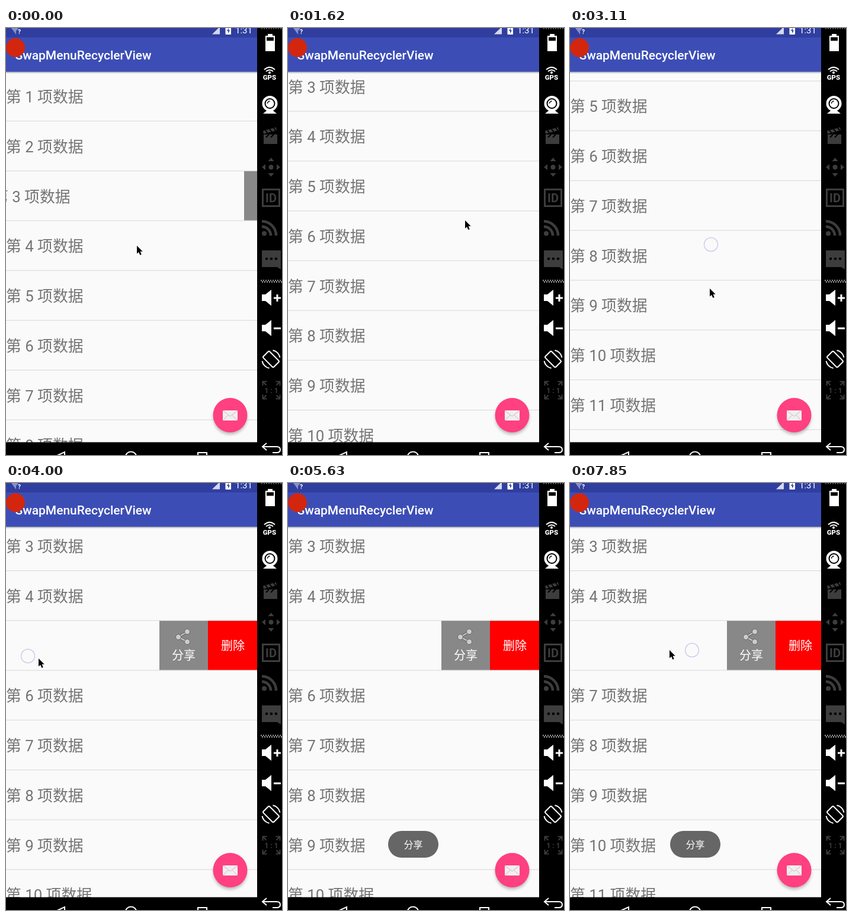
An HTML page that plays this animation: 466x718 px, repeating every 8000 ms.

```html
<!DOCTYPE html>
<html lang="zh">
<head>
<meta charset="utf-8">
<title>SwapMenuRecyclerView</title>
<style>
html, body { margin: 0; width: 100%; height: 100%; overflow: hidden; background: #000; }
svg { display: block; }
text { font-family: Roboto, "Noto Sans CJK SC", "Noto Sans CJK", sans-serif; }
.label { font-size: 25.8px; fill: #747474; }
.action { font-size: 20px; fill: #fff; text-anchor: middle; }
.dim { fill: #3d3d3d; }
.dimLine { fill: none; stroke: #3d3d3d; }
.line { fill: none; stroke: #fff; stroke-width: 2; }
</style>
</head>
<body>
<svg width="466" height="718" viewBox="0 0 466 718">
  <defs>
    <clipPath id="listClip"><rect y="73" width="424" height="624"/></clipPath>
    <linearGradient id="barShade" x2="0" y2="1">
      <stop stop-color="#000" stop-opacity=".35"/><stop offset="1" stop-color="#000" stop-opacity="0"/>
    </linearGradient>
    <filter id="soft" x="-30%" y="-30%" width="160%" height="160%"><feGaussianBlur stdDeviation="2.5"/></filter>
    <g id="share" fill="#ccc" stroke="#666">
      <path d="M47 19L32 28L47 36" fill="none" stroke-width="4"/>
      <path d="M47 19L32 28L47 36" fill="none" stroke="#ccc" stroke-width="2"/>
      <circle cx="47" cy="19" r="4.5"/><circle cx="32" cy="28" r="4.5"/><circle cx="47" cy="36" r="4.5"/>
    </g>
    <path id="speaker" d="M432 -6h6l10 -8v27l-10 -8h-6z" fill="#fff"/>
    <path id="corner" class="dimLine" d="M-14.500 -7.500v-7h7M-14.500 -14.500l6 6" stroke-width="2"/>
    <path id="turn" class="line" d="M3 -15a15 15 0 0 1 12 12"/>
  </defs>

  <rect width="424" height="718" fill="#fafafa"/>
  <g id="list" clip-path="url(#listClip)"></g>
  <rect y="73" width="424" height="4" fill="url(#barShade)"/>

  <!-- status and app bars -->
  <rect y="15" width="424" height="58.600" fill="#3c4eb6"/>
  <rect width="424" height="16" fill="#303f9f"/>
  <path d="M9 0h12l-4 5v6z" fill="#8790c8"/>
  <text x="20" y="10" font-size="10" font-weight="700" fill="#fff">?</text>
  <path d="M348 10.500L361 -2v12.500z" fill="#d5d9ee"/>
  <rect x="370.500" y="-2" width="9.500" height="13" rx="1" fill="#fff"/>
  <path d="M376 0l-3 5h2v4l3-5h-2z" fill="#303f9f"/>
  <text x="387" y="9" font-size="15" fill="#fff">1:31</text>
  <text x="15.500" y="53" font-size="20.940" font-weight="500" fill="#fff">SwapMenuRecyclerView</text>
  <circle cx="16" cy="33" r="16" fill="#d3260f"/>

  <!-- toast and floating button -->
  <g id="toast">
    <rect x="169" y="585" width="85" height="45" rx="22.500" fill="#666"/>
    <text x="211.500" y="613.500" font-size="16" fill="#fff" text-anchor="middle">分享</text>
  </g>
  <circle cx="378.500" cy="655" r="28.500" opacity=".25" filter="url(#soft)"/>
  <circle cx="378.500" cy="651" r="29" fill="#ff4081"/>
  <rect x="366" y="643" width="25" height="17" fill="#f1eef0"/>
  <path d="M366 643l12.500 10L391 643M366 660l9.500-9.500M391 660l-9.500-9.500" fill="none" stroke="#c4bcc0"/>

  <!-- navigation bar -->
  <rect y="696.500" width="424" height="22"/>
  <g class="line"><path d="M86 719l13-6v6"/><circle cx="211" cy="722" r="9.500"/><path d="M324 719v-5h15v5"/></g>

  <!-- emulator tools -->
  <rect x="424" width="42" height="718"/>
  <path d="M431 1h35" stroke="#555" stroke-width="2" stroke-dasharray="2 2"/>
  <path d="M430 424.500h36M432 427h34" stroke="#aaa" stroke-width="2" stroke-dasharray="2 2"/>
  <path d="M442 10h8v3h4v26h-16v-26h4z" fill="#fff"/>
  <rect x="440" y="15.500" width="12" height="6"/>
  <path class="line" d="M436 70q9-8 18 0M439 73q6-5 12 0"/>
  <circle cx="445" cy="75" r="2" fill="#fff"/>
  <text x="445" y="87" font-size="11.500" font-weight="900" fill="#fff" text-anchor="middle">GPS</text>
  <circle cx="445.500" cy="127" r="13" fill="#fff"/>
  <circle cx="445.500" cy="127" r="8" fill="none" stroke="#000" stroke-width="2"/>
  <path d="M441.500 127a4 4 0 0 1 4-4" fill="none" stroke="#000" stroke-width="1.500"/>
  <path d="M440 139h11l6 5h-23z" fill="#fff"/>
  <path class="dim" d="M435 179h23v16h-23zM434 173l22-6 1 5-22 6z"/>
  <path d="M438 172l4 5M445 170l4 5M452 168l4 5M439 184l5-5M447 184l5-5" stroke="#000" stroke-width="2"/>
  <circle class="dim" cx="447.500" cy="234" r="4"/>
  <path class="dim" d="M447.500 218l5 6h-10zM447.500 250l5-6h-10zM432 234l6-5v10zM463 234l-6-5v10z"/>
  <rect class="dimLine" x="433.500" y="271.500" width="28" height="28" stroke-width="3"/>
  <text class="dim" x="447.500" y="293" font-size="20" font-weight="700" text-anchor="middle">ID</text>
  <path class="dimLine" stroke-width="4.500" d="M432 334a15 15 0 0 1 15 15M432 325a24 24 0 0 1 24 24"/>
  <circle class="dim" cx="436" cy="345.500" r="4"/>
  <path class="dim" d="M432 374h32v32l-6-4h-26z"/>
  <path d="M440 388h17" stroke="#000" stroke-width="4.600" stroke-linecap="round" stroke-dasharray="0 8"/>
  <use href="#speaker" y="454"/><use href="#speaker" y="505"/>
  <path class="line" d="M452 454h12M458 448v12M452 505h12" style="stroke-width:3"/>
  <g transform="translate(447.500 557)">
    <rect class="line" x="-7.500" y="-12.500" width="15" height="25" rx="2" transform="rotate(-45)"/>
    <use href="#turn"/><use href="#turn" transform="rotate(180)"/>
  </g>
  <g transform="translate(448 609)">
    <use href="#corner"/><use href="#corner" transform="rotate(90)"/>
    <use href="#corner" transform="rotate(180)"/><use href="#corner" transform="rotate(270)"/>
    <text class="dim" y="4.500" font-size="12" font-weight="700" text-anchor="middle">1 : 1</text>
  </g>
  <path class="line" d="M440 698l-7 6 7 6M433 704h24q6 0 6 5t-6 5h-7"/>

  <circle id="touch" r="11.500" fill="none" stroke="#cdcdec" stroke-width="1.500"/>
  <g id="cursor"><path d="M0 0V14.500L3.300 11.500L5.700 17L8.300 16L6 10.500H10.500Z" stroke="#fff" paint-order="stroke" transform="scale(.93)"/></g>
</svg>
<script>
const LOOP = 8000, STEP = 148.1, ROW = 83.75, TOP = 72.5, MENU = 165, WIDTH = 424;
const $ = id => document.getElementById(id);

const gestures = [
  { from: 7, to: 10, scroll: 184 },
  { from: 12, to: 14, row: 5, swipe: MENU },
  { from: 18, to: 20, scroll: 134.7, row: 5, swipe: -MENU },
  { from: 21, to: 23, scroll: -142.2 },
  { from: 25, to: 27, row: 5, swipe: MENU },
  { from: 49, to: 53.15, row: 6, swipe: MENU }
];

// Places the mouse passes: step, x, y.
const stops = [
  [0, 221, 366], [6, 134, 572], [7, 196, 510], [8, 206, 484],
  [12, 330, 270], [14, 150, 268], [17, 209, 488], [20, 238, 364], [21, 236, 438], [23, 240, 480],
  [25, 285, 293], [26, 37, 291], [27, 55, 295], [31, 285, 270], [39, 285, 270],
  [40, 451, 300], [43, 385, 275], [48, 366, 323], [49, 320, 281], [53, 168, 281]
];

const ramp = (k, from, to) => Math.min(1, Math.max(0, (k - from) / (to - from)));

const total = (k, kind, row) => gestures
  .filter(g => g[kind] && (!row || g.row === row))
  .reduce((sum, g) => sum + g[kind] * ramp(k, g.from, g.to), 0);

function pointer(k) {
  const i = Math.max(1, stops.findIndex(s => s[0] >= k));
  const [from, x0, y0] = stops[i - 1], [to, x1, y1] = stops[i], p = ramp(k, from, to);
  return [x0 + (x1 - x0) * p, y0 + (y1 - y0) * p];
}

const rows = Array.from({ length: 13 }, (_, i) => {
  const row = document.createElementNS("http://www.w3.org/2000/svg", "g");
  row.innerHTML = `<g class="slide"><text class="label" y="52.5">第 ${i + 1} 项数据</text>
    <g transform="translate(${WIDTH})">
      <rect y=".75" width="82" height="83" fill="#888"/><rect x="82" y=".75" width="83" height="83" fill="#f00"/>
      <use href="#share"/><text class="action" x="41" y="66">分享</text>
      <text class="action" x="124" y="49.5">删除</text>
    </g></g><rect y="${ROW - 0.25}" width="${WIDTH}" height="1" fill="#d8d8d8"/>`;
  $("list").append(row);
  return row;
});

const move = (el, x, y) => el.setAttribute("transform", `translate(${x} ${y})`);
const show = (el, visible) => el.style.display = visible ? "" : "none";

function draw(k) {
  const scroll = total(k, "scroll"), gap = ROW * ramp(k, 44, 46);
  rows.forEach((row, i) => {
    const n = i + 1;
    const closing = n === 3 ? 22 * (1 - ramp(k, 0, 1)) : 0;
    move(row, 0, TOP + i * ROW - scroll - (n > 5 ? gap : 0));
    move(row.querySelector(".slide"), -Math.round(total(k, "swipe", n) + closing), 0);
  });
  rows[4].setAttribute("opacity", 1 - ramp(k, 43, 44));
  $("toast").setAttribute("opacity", ramp(k, 33, 36));

  move($("cursor"), ...pointer(k));
  show($("cursor"), k < 38 || k >= 40);
  // The touch ring trails the mouse by one step.
  move($("touch"), ...pointer(k - 1));
  show($("touch"), gestures.some(g => k >= g.from && k <= g.to));
}

function frame() {
  const time = performance.now() % LOOP;
  draw(Math.min(53, Math.floor((time + 16) / STEP)));
  requestAnimationFrame(frame);
}
frame();
</script>
</body>
</html>
```
